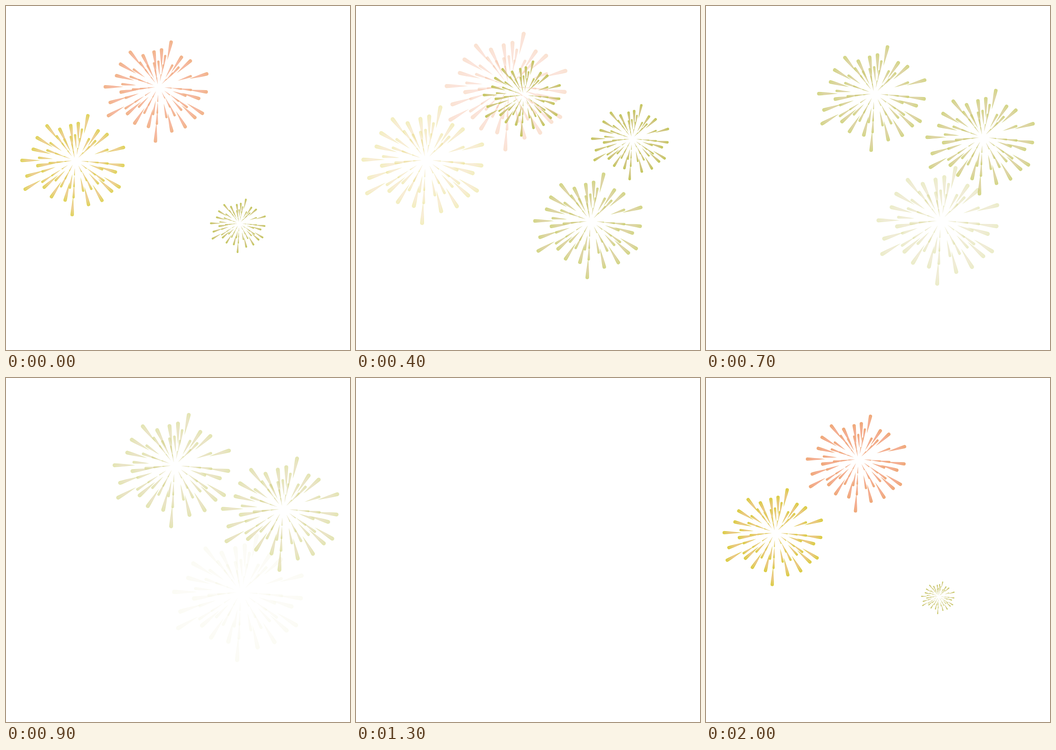
An HTML page for the animation above (2.1 s loop, 748 by 748 pixels).

```html
<!DOCTYPE html>
<html lang="en">
<head>
<meta charset="utf-8">
<title>Fireworks</title>
<style>
  html, body { margin: 0; width: 100%; height: 100%; overflow: hidden; background: #fff; }
  svg { display: block; width: 100vw; height: 100vh; }
</style>
</head>
<body>
<svg id="sky" viewBox="0 0 748 748"></svg>
<script>
const NS = 'http://www.w3.org/2000/svg';
const LOOP = 2100, STEP = 100, GROW = 4.5, LIFE = 12;
const UNIT = 0.8833;          // burst scale at which the rays are measured
const HUB = [5.5, -11.5];     // hub relative to the middle of the burst

// Outline of a burst: angle in degrees and reach of each outer ray.
const spokes = [
  [-74, 114], [-52, 92], [-39, 101], [-15, 123], [6, 118], [16, 103],
  [31, 126], [40, 117], [56, 118], [73, 113], [93, 133], [104, 100],
  [123, 106], [139, 100], [150, 141], [162, 124], [172, 92], [180, 130],
  [195, 106], [211, 108], [231, 109], [244, 85], [263, 86], [275, 91]
];

// Smaller copies of the outline fill the inside; the innermost skip rays.
const rings = [
  { size: 0.27, every: 2 },
  { size: 0.48, every: 2 },
  { size: 0.68, every: 1 },
  { size: 1, every: 1 }
];

const palette = {
  orange: { core: '#f5ae96', rim: '#efa877' },
  yellow: { core: '#edc68c', rim: '#dacd40' },
  green: { core: '#d4c48c', rim: '#c3c75a' }
};

const bursts = [
  { x: 326.3, y: 186, hue: 'orange', start: 1600 },
  { x: 145.2, y: 346, hue: 'yellow', start: 1600 },
  { x: 504.2, y: 478, hue: 'green', start: 1900 },
  { x: 360.5, y: 201.2, hue: 'green', start: 100 },
  { x: 596, y: 296, hue: 'green', start: 100 }
];

const sky = document.getElementById('sky');

function add(parent, tag, attrs) {
  const el = document.createElementNS(NS, tag);
  for (const key in attrs) el.setAttribute(key, attrs[key]);
  return parent.appendChild(el);
}

function addRay(parent, degrees, reach, size) {
  const a = degrees * Math.PI / 180;
  const x = reach * Math.cos(a), y = reach * Math.sin(a);
  const aim = x > 0 ? 8 * size : 0;    // rays on the right lean a little
  const turn = Math.atan2(y, x - aim) * 180 / Math.PI;
  const length = 45 * size ** 0.75, r = 4.2 * size;
  const bend = -0.35 * length, half = 0.8 * r;
  add(parent, 'path', {
    d: `M${-length} 0Q${bend} ${-half} 0 ${-r}A${r} ${r} 0 0 1 0 ${r}Q${bend} ${half} ${-length} 0Z`,
    transform: `translate(${x} ${y}) rotate(${turn})`
  });
}

function addRing(parent, { size, every }) {
  spokes.forEach(([angle, reach], i) => {
    if (i % every) return;
    const sway = size < 1 ? 5 * Math.sin(0.57 * i - 2.4) : 0;
    addRay(parent, angle + sway, reach * size, size);
  });
}

const defs = add(sky, 'defs', {});
for (const hue in palette) {
  const { core, rim } = palette[hue];
  const gradient = add(defs, 'radialGradient', { id: hue, cx: 0.55, r: 0.48 });
  add(gradient, 'stop', { offset: 0.2, 'stop-color': core });
  add(gradient, 'stop', { offset: 1, 'stop-color': rim });
}

for (const burst of bursts) {
  burst.el = add(sky, 'g', { fill: `url(#${burst.hue})` });
  const rays = add(burst.el, 'g', {
    transform: `scale(${1 / UNIT}) translate(${HUB})`
  });
  for (const ring of rings) addRing(rays, ring);
}

function draw(time) {
  for (const { el, x, y, start } of bursts) {
    const age = (time - start + LOOP) % LOOP;
    const u = Math.floor(age / STEP) + 0.5;
    if (u > LIFE) {
      el.setAttribute('visibility', 'hidden');
      continue;
    }
    const fade = Math.max(0, (u - GROW) / (LIFE - GROW));
    const scale = u < GROW ? 0.75 * u / GROW : 0.75 + 0.25 * fade;
    el.setAttribute('visibility', 'visible');
    el.setAttribute('transform', `translate(${x} ${y}) scale(${scale})`);
    el.setAttribute('fill-opacity', 1 - fade);
  }
}

const begin = performance.now();
function tick() {
  draw((performance.now() - begin) % LOOP);
  requestAnimationFrame(tick);
}
tick();
</script>
</body>
</html>
```
